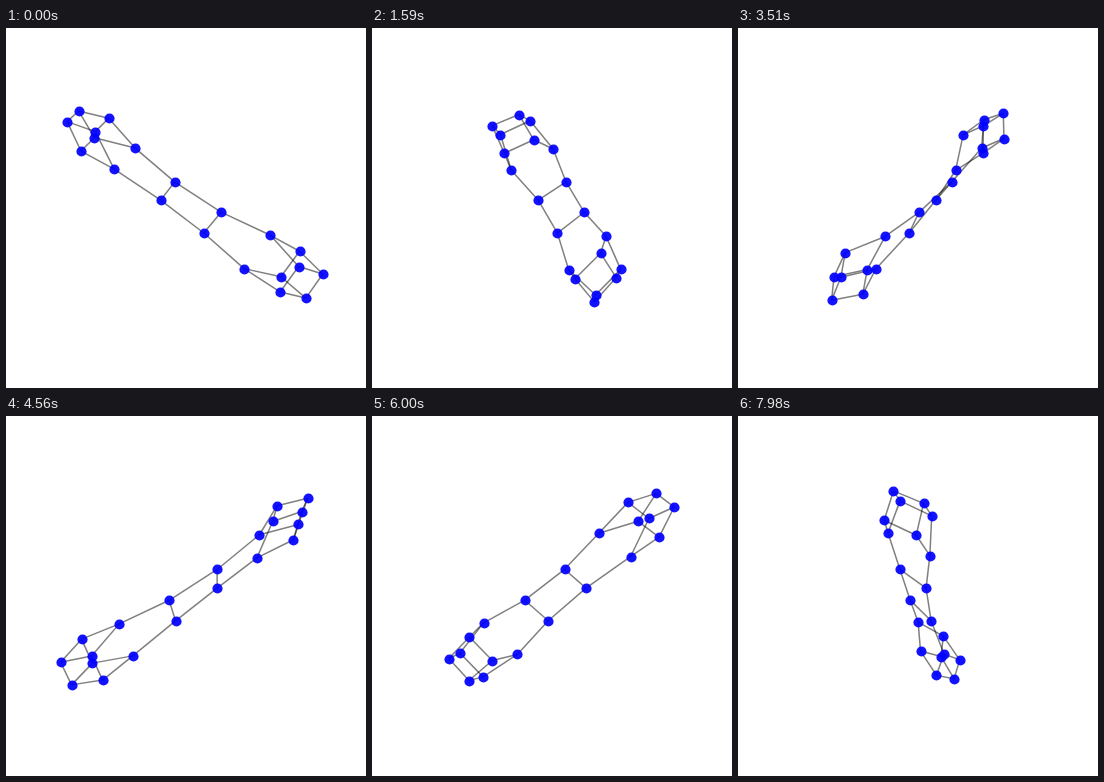
Write an HTML page with a canvas that moves like this. It is 360 by 360 pixels and loops after 8 s.

```html
<!DOCTYPE html>
<html lang="en">
<head>
<meta charset="utf-8">
<title>Rotating graph</title>
<style>
  html, body { margin: 0; height: 100%; overflow: hidden; background: #fff; }
  canvas { display: block; }
</style>
</head>
<body>
<canvas id="stage" width="360" height="360"></canvas>
<script>
const ctx = document.getElementById('stage').getContext('2d');

const LOOP = 8000, STEP = 30;          // ms; the graph turns one degree per step
const CENTER_X = 185, CENTER_Y = 177, CAMERA = 1900;
const NODE_RADIUS = 5.1;
const RADIAN = Math.PI / 180;

// Body frame of the graph as [x, z, height]; height points down.
const origin = [-0.2, 0.7, -1.3];
const along = [0.803, -0.189, 0.565];
const bend = [0.124, -0.872, -0.474];
const across = cross(along, bend);

// Each half is a twisted ladder that ends in a cube with one edge (rung 1) open.
const rungs = [
  { distance: 28, width: 33.7, shift: 0 },
  { distance: 82.7, width: 49, shift: 0, open: true },
  { distance: 118.9, width: 34.8, shift: 14.7 },
  { distance: 123.5, width: 34.8, shift: -14.7 },
  { distance: 149.8, width: 31.5, shift: 0 }
];
const rails = [[0, 1], [1, 2], [1, 3], [2, 4], [3, 4]];
const ends = [-0.5, 0.5];

const halves = [-1, 1].map(side => rungs.map(rung => ends.map(end => place(side, rung, end))));
const nodes = halves.flat(2);
const edges = ends.map((_, end) => [halves[0][0][end], halves[1][0][end]]);
for (const half of halves) {
  half.forEach((pair, i) => { if (!rungs[i].open) edges.push(pair); });
  for (const [from, to] of rails) {
    ends.forEach((_, end) => edges.push([half[from][end], half[to][end]]));
  }
}

function cross([ax, ay, az], [bx, by, bz]) {
  return [ay * bz - az * by, az * bx - ax * bz, ax * by - ay * bx];
}

// Position of one end of a rung: bowed along the axis, twisted around it.
function place(side, { distance, width, shift }, end) {
  const twist = (14.5 - side * (2 + 0.11 * distance)) * RADIAN;
  const cos = Math.cos(twist), sin = Math.sin(twist);
  const offset = width * end;
  const a = side * distance + end * (2.8 - 1.4 * side);
  const b = distance ** 2 / 1500 - 6.9 + offset * sin + shift * cos;
  const c = shift * sin - offset * cos;
  return origin.map((o, i) => o + a * along[i] + b * bend[i] + c * across[i]);
}

function project([x, z, height], angle) {
  const cos = Math.cos(angle), sin = Math.sin(angle);
  const towardViewer = x * sin - z * cos;
  const scale = CAMERA / (CAMERA - towardViewer);
  return [CENTER_X + (x * cos + z * sin) * scale, CENTER_Y + height * scale];
}

function draw(time) {
  const angle = Math.floor(time % LOOP / STEP) * RADIAN;

  ctx.fillStyle = '#fff';
  ctx.fillRect(0, 0, 360, 360);

  // Stroked one by one so that overlapping edges darken.
  ctx.strokeStyle = 'rgba(0, 0, 0, 0.5)';
  ctx.lineWidth = 1.5;
  for (const [from, to] of edges) {
    ctx.beginPath();
    ctx.moveTo(...project(from, angle));
    ctx.lineTo(...project(to, angle));
    ctx.stroke();
  }

  // Discs snap to whole pixels, edges do not.
  ctx.fillStyle = 'rgba(0, 0, 255, 0.93)';
  for (const node of nodes) {
    const [x, y] = project(node, angle).map(v => Math.round(v) + 0.5);
    ctx.beginPath();
    ctx.arc(x, y, NODE_RADIUS, 0, 2 * Math.PI);
    ctx.fill();
  }
}

const start = performance.now();
function tick() {
  draw(performance.now() - start);
  requestAnimationFrame(tick);
}
tick();
</script>
</body>
</html>
```
